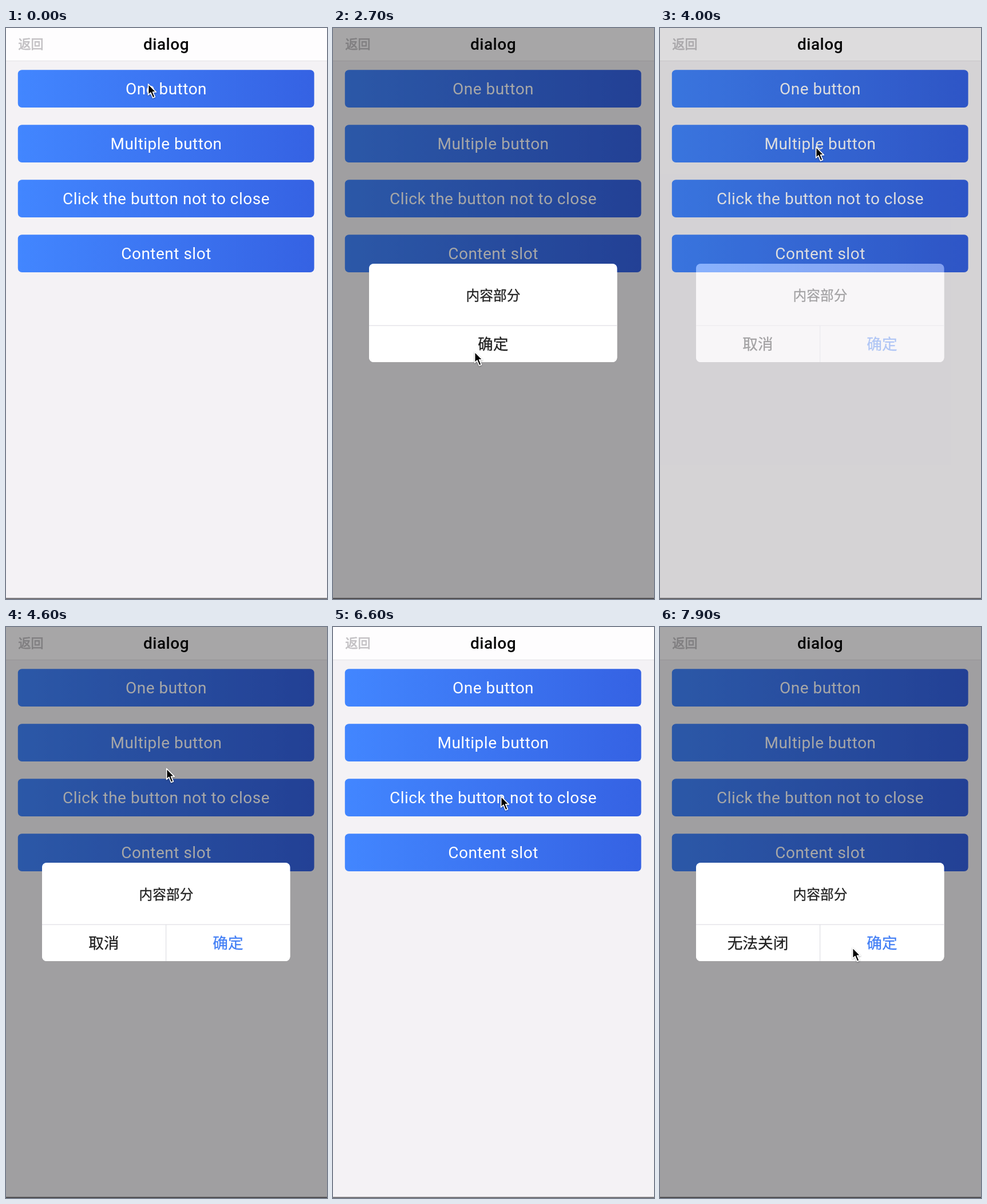
An HTML page that plays this animation: 561x998 px, repeating every 8 s.

```html
<!DOCTYPE html>
<html lang="en">
<head>
<meta charset="utf-8">
<title>dialog</title>
<style>
  html, body { margin: 0; width: 100%; height: 100%; overflow: hidden; background: #f4f2f5; }
  svg { display: block; width: 561px; height: 998px; }
  text { text-anchor: middle; font-family: Roboto, "Open Sans", sans-serif; letter-spacing: .5px; }
  .label { font-size: 28px; fill: #fff; }
  .title { font-size: 28px; font-weight: 500; fill: #050505; }
  .zh { font-family: "Noto Sans CJK SC", "Noto Sans CJK", sans-serif; letter-spacing: 0; fill: #222; stroke: #222; stroke-width: .3px; }
  .back { font-size: 22px; fill: #c3c1c4; stroke: #c3c1c4; stroke-width: .8px; }
  .body { font-size: 23.7px; }
  .action { font-size: 26.7px; }
  .primary { fill: #437ff5; stroke: #437ff5; }
  #cursor { filter: drop-shadow(0 1.5px 1px rgba(0, 0, 0, .35)); }
</style>
</head>
<body>
<svg viewBox="0 0 561 998">
  <defs>
    <linearGradient id="blue">
      <stop offset="0" stop-color="#4286ff"/>
      <stop offset="1" stop-color="#3562e3"/>
    </linearGradient>
  </defs>
  <rect width="561" height="998" fill="#f4f2f5"/>
  <rect width="561" height="57" fill="#fefdfe"/>
  <rect y="57" width="561" height="1" fill="#e4e2e5"/>
  <text class="zh back" x="43.5" y="36.4">返回</text>
  <text class="title" x="280" y="38">dialog</text>
  <g id="buttons"></g>
  <rect y="996" width="561" height="2" fill="#7b797c"/>

  <g id="dialog">
    <path fill="#000" fill-opacity=".345" fill-rule="evenodd"
      d="M0 0H561V998H0ZM71 412H488.5a8 8 0 0 1 8 8V576a8 8 0 0 1 -8 8H71a8 8 0 0 1 -8 -8V420a8 8 0 0 1 8 -8Z"/>
    <rect x="63" y="412" width="433.5" height="172" rx="8" fill="#fff"/>
    <rect x="63" y="519.5" width="433.5" height="1.2" fill="#dfdee4"/>
    <rect id="divider" x="279" y="520" width="1.2" height="64" fill="#dfdee4"/>
    <text class="zh body" x="280" y="475.5">内容部分</text>
    <text id="cancel" class="zh action" x="171" y="562.3"></text>
    <text id="confirm" class="zh action" y="562.3">确定</text>
  </g>

  <path id="cursor" stroke="#fff" stroke-width="1.7" stroke-linejoin="round"
    d="M1.6 2V21L5.9 17L9.6 26L13.3 24.4L9.6 15.8H15.3Z"/>
</svg>
<script>
const LOOP = 8000, STEP = 100, FADE = 300;
const $ = id => document.getElementById(id);

const labels = ['One button', 'Multiple button', 'Click the button not to close', 'Content slot'];
$('buttons').innerHTML = labels.map((label, i) => `
  <rect x="20.8" y="${73.2 + 96 * i}" width="517.8" height="65.9" rx="7" fill="url(#blue)"/>
  <text class="label" x="280" y="${115.7 + 96 * i}">${label}</text>`).join('');

const dialogs = [
  { open: 1198, close: 2950, cancel: '' },
  { open: 3886, close: 5475, cancel: '取消' },
  { open: 6800, close: Infinity, cancel: '无法关闭' },
];

// Cursor stops: time, x, y
const stops = [
  [0, 247, 96], [900, 247, 96], [1100, 246, 96], [1700, 246, 96],
  [2250, 249, 590], [2600, 246, 564], [3000, 246, 564],
  [3650, 271, 206], [4450, 271, 206], [5150, 339, 540.5], [5700, 339, 540.5],
  [6400, 292, 294], [7150, 292, 294], [7750, 335, 558.5], [8000, 335, 558.5],
];

const clamp = v => Math.max(0, Math.min(1, v));
const ease = v => v * v * (3 - 2 * v);

function cursorAt(t) {
  const i = stops.findIndex(s => s[0] > t);
  const [t0, x0, y0] = stops[i - 1], [t1, x1, y1] = stops[i];
  const k = ease((t - t0) / (t1 - t0));
  return [x0 + (x1 - x0) * k, y0 + (y1 - y0) * k];
}

function draw(t) {
  const dialog = dialogs.filter(d => d.open <= t).pop() || dialogs[0];
  const opacity = Math.min(clamp((t - dialog.open) / FADE), 1 - clamp((t - dialog.close) / FADE));
  const paired = dialog.cancel !== '';

  $('dialog').setAttribute('opacity', opacity);
  $('divider').setAttribute('visibility', paired ? 'inherit' : 'hidden');
  $('cancel').textContent = dialog.cancel;
  $('confirm').setAttribute('x', paired ? 388 : 279.8);
  $('confirm').classList.toggle('primary', paired);
  $('cursor').setAttribute('transform', `translate(${cursorAt(t)})`);
}

const start = performance.now();
function tick() {
  const t = (performance.now() - start) % LOOP;
  draw(Math.floor(t / STEP) * STEP);
  requestAnimationFrame(tick);
}
tick();
</script>
</body>
</html>
```
